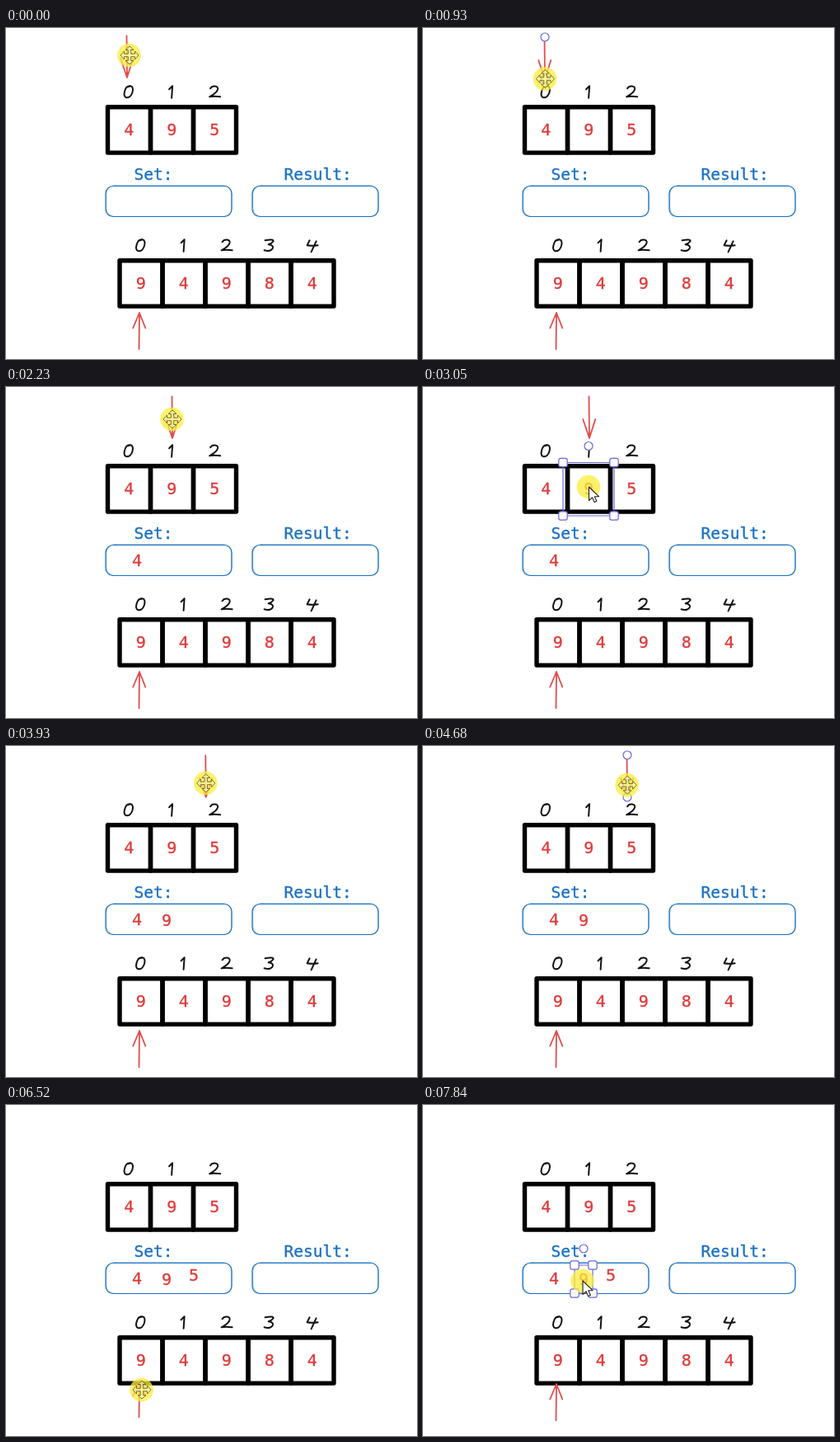
These frames come from a looping animation (499x401 px, 8 s). An HTML page with a canvas:

```html
<!DOCTYPE html>
<html lang="en">
<head>
<meta charset="utf-8">
<title>Set intersection walkthrough</title>
<style>
  html, body { margin: 0; width: 100%; height: 100%; overflow: hidden; background: #fff; }
  canvas { display: block; }
</style>
</head>
<body>
<canvas id="stage" width="499" height="401"></canvas>
<script>
const ctx = document.getElementById('stage').getContext('2d');
const LOOP = 8000, TICK = 66.6, PITCH = 52;
const RED = '#e03b3b', ARROW = '#e24c4c', BLUE = '#1971c2', VIOLET = '#6965db';

// Hand-drawn index digits, centred on the origin
const GLYPHS = [
  'M1 -7C-5 -7 -8 6 -3 7C4 8 8 -6 2 -7L-1 -6',
  'M-3 -3L1 -7L0 7.5',
  'M-5 -4C-3 -8 5 -8 4 -3C3 1 -2 4 -6 6Q0 5 7 6',
  'M-5 -6Q5 -8 5 -5Q3 -2 -1 -1Q6 0 4 4Q1 8 -6 6',
  'M-3 -6L-6 0Q0 1 7 0M5 -5L-1 8'
].map(d => new Path2D(d));
const POINTER = new Path2D('M0 0V16.5L4 12.8L6.6 18.6L9.4 17.3L6.8 11.7H12Z');

// Each visit: drag the arrow over a cell, dive into the cell, copy its digit to the set
const VISITS = [
  { x: 148, grab: pt(3, -27), drag: [0, 66], select: 400, dive: [670, 1210], pick: 1410, copy: 1410, drop: pt(159, 210) },
  { x: 202, grab: pt(14, -23), drag: [1410, 2160], select: 2300, dive: [2430, 2850], pick: 3050, copy: 3320, drop: pt(195, 211) },
  { x: 248, grab: pt(0, -17), drag: [3460, 4050], select: 4270, dive: [4610, 5240], pick: 5500, copy: 5770, drop: pt(228, 206) }
];
const DONE = VISITS[2].copy;

function pt(x, y) { return { x, y }; }
const add = (a, x, y) => pt(a.x + x, a.y + y);
const mix = (a, b, p) => pt(a.x + (b.x - a.x) * p, a.y + (b.y - a.y) * p);
const within = (t, a, b) => t >= a && t < b;

// Eased progress from a to b, advancing once per tick
function glide(t, a, b) {
  const ticked = Math.floor((t - a) / TICK) * TICK;
  const p = t >= b ? 1 : Math.max(0, Math.min(1, ticked / (b - a)));
  return p * p * (3 - 2 * p);
}

function topTip(t) {
  return VISITS.reduce((tip, v) => mix(tip, pt(v.x, 62), glide(t, ...v.drag)), pt(147, 60));
}

function lowTip(t) {
  return pt(162, 345 - 11 * glide(t, 6050, 6190) + 4 * glide(t, 6520, 6870));
}

function cursorAt(t) {
  if (t >= DONE) {
    const hold = add(lowTip(t), 3, 11);
    const nine = add(VISITS[1].drop, -1, 16 - 14 * glide(t, 7770, 7840));
    return mix(mix(add(VISITS[2].drop, 0, 6), hold, glide(t, DONE, 6060)), nine, glide(t, 7000, 7490));
  }
  const i = VISITS.findIndex(v => t < v.copy), v = VISITS[i];
  if (t < v.drag[0]) return add(VISITS[i - 1].drop, 0, 3);
  const held = add(topTip(t), v.grab.x * (1 - glide(t, ...v.drag)), v.grab.y);
  return mix(held, pt(149.5 + PITCH * i, 121), glide(t, ...v.dive));
}

function pen(color, width) {
  ctx.strokeStyle = color;
  ctx.lineWidth = width;
}

function label(s, x, y, color, align, size) {
  ctx.font = size + 'px "DejaVu Sans Mono", monospace';
  ctx.textAlign = align;
  ctx.fillStyle = color;
  ctx.fillText(s, x, y);
  pen(color, 0.35);
  ctx.strokeText(s, x, y);
}

const digit = (s, { x, y }) => label(s, x, y + 6.9, RED, 'center', 20);

function array(values, x, y) {
  [...values].forEach((v, i) => {
    const left = x + i * PITCH;
    pen('#000', 5.4);
    ctx.strokeRect(left, y, PITCH, 55.3);
    digit(v, pt(left + 25.8, y + 27.5));
    ctx.save();
    ctx.translate(left + 25.6, y - 18.5);
    pen('#111', 2);
    ctx.stroke(GLYPHS[i]);
    ctx.restore();
  });
}

// Two slightly different passes give the sketched outline
function panel(x, y, w, h) {
  for (const d of [0, 0.7]) {
    pen(BLUE, 1.2 - d);
    ctx.beginPath();
    ctx.roundRect(x + d, y - d, w - d, h + d, 9 + 2 * d);
    ctx.stroke();
  }
}

// dir is +1 pointing down, -1 pointing up
function arrow({ x, y }, dir, length, barb) {
  pen(ARROW, 1.8);
  ctx.beginPath();
  ctx.moveTo(x - 0.5, y - dir * length);
  ctx.lineTo(x, y);
  ctx.moveTo(x - 7.8, y - dir * barb);
  ctx.lineTo(x, y);
  ctx.lineTo(x + 7.3, y - dir * barb);
  ctx.stroke();
}

function knob(x, y) {
  ctx.fillStyle = '#fff';
  pen(VIOLET, 1.2);
  ctx.beginPath();
  ctx.arc(x, y, 5, 0, Math.PI * 2);
  ctx.fill();
  ctx.stroke();
}

function ends({ x, y }, dir, length) {
  knob(x, y);
  knob(x, y - dir * length);
}

function selection(x, y, w, h) {
  pen(VIOLET, 1.2);
  ctx.strokeRect(x, y, w, h);
  ctx.fillStyle = '#fff';
  for (const cx of [x, x + w]) for (const cy of [y, y + h]) {
    ctx.beginPath();
    ctx.roundRect(cx - 5.2, cy - 5.2, 10.4, 10.4, 2.5);
    ctx.fill();
    ctx.stroke();
  }
  knob(x + w / 2, y - 20);
}

function moveIcon() {
  ctx.beginPath();
  for (let i = 0; i < 4; i++) {
    for (const [x, y] of [[1.7, -1.7], [6.5, -1.7], [6.5, -5], [11, 0], [6.5, 5], [6.5, 1.7]])
      ctx.lineTo(x, y);
    ctx.rotate(Math.PI / 2);
  }
  ctx.closePath();
  ctx.fillStyle = 'rgba(255,255,210,.45)';
  ctx.fill();
  pen('rgba(85,78,45,.8)', 1);
  ctx.stroke();
}

function cursor({ x, y }) {
  ctx.fillStyle = 'rgba(250,236,60,.76)';
  ctx.beginPath();
  ctx.arc(x - 0.5, y, 14.3, 0, Math.PI * 2);
  ctx.fill();
  ctx.save();
  ctx.translate(x, y);
  if (y < 64 || y > 338) moveIcon();
  else {
    ctx.fillStyle = '#fff';
    ctx.fill(POINTER);
    pen('#222', 1.1);
    ctx.stroke(POINTER);
  }
  ctx.restore();
}

function draw(t) {
  ctx.fillStyle = '#fff';
  ctx.fillRect(0, 0, 499, 401);
  ctx.lineJoin = ctx.lineCap = 'round';

  const values = '495', top = topTip(t), low = lowTip(t);
  array(values, 123.5, 95.8);
  array('94984', 138, 281.8);
  label('Set:', 155.5, 183.6, BLUE, 'left', 19.5);
  label('Result:', 337.5, 184.2, BLUE, 'left', 19.5);
  panel(121, 191.5, 153, 37);
  panel(299, 191.5, 153, 37);

  if (t < DONE) arrow(top, 1, 50.5, 23);
  arrow(low, -1, 44, 18.5);

  VISITS.forEach((v, i) => {
    if (t >= v.copy) digit(values[i], v.drop);
    if (within(t, v.select, v.pick)) ends(top, 1, 51);
    if (within(t, v.pick, v.copy)) selection(118 + PITCH * i, 91.5, 62, 64.5);
  });
  if (within(t, 6870, 7840)) ends(low, -1, 45);
  if (t >= 7840) selection(184, 194, 22, 34);

  cursor(cursorAt(t));
}

const begin = performance.now();
function frame() {
  draw((performance.now() - begin) % LOOP);
  requestAnimationFrame(frame);
}
frame();
</script>
</body>
</html>
```
